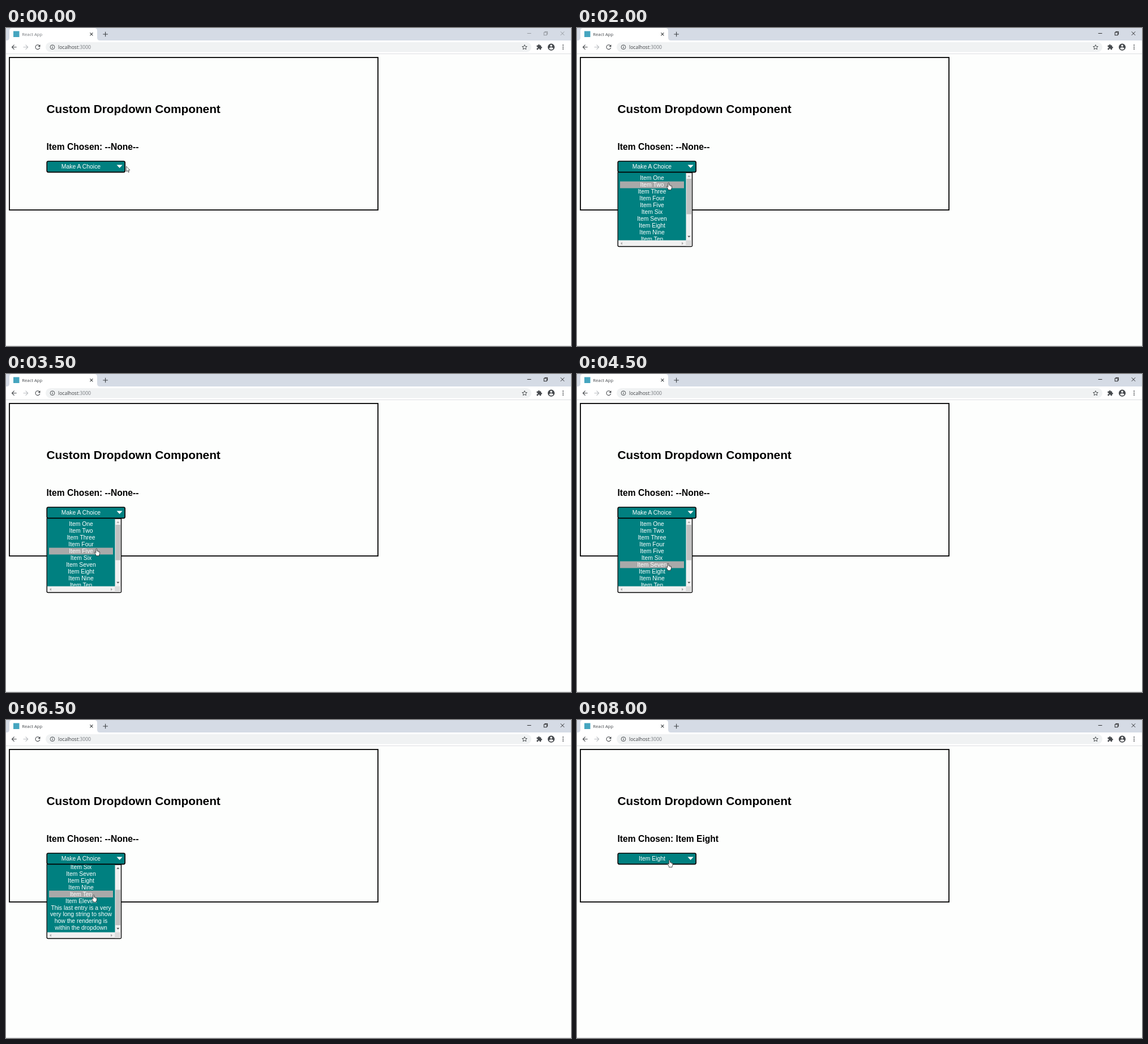
These frames come from a looping animation (998 by 561 pixels, 8500 ms). An HTML page:

```html
<!DOCTYPE html>
<html lang="en">
<head>
<meta charset="utf-8">
<title>Custom Dropdown Component</title>
<style>
  html, body { margin: 0; width: 100%; height: 100%; overflow: hidden; background: #fdfefd; }
  svg { display: block; width: 100vw; height: 100vh; font: 10.4px "Liberation Sans", Arial, sans-serif; }
  .ui { font-family: "Open Sans", "Noto Sans", sans-serif; }
  .heading { font-weight: bold; }
  .item { fill: #fff; text-anchor: middle; }
  .line { fill: none; stroke: #3c4043; }
  .icon { fill: #46494d; }
  #controls { fill: none; stroke: #1c1c1c; stroke-width: .9; }
  #tabTitle { fill: #45494d; }
  .inactive #controls { stroke: #8f9399; }
  .inactive #tabTitle { fill: #74787d; }
</style>
</head>
<body>
<svg id="stage" viewBox="0 0 998 561">
  <defs>
    <clipPath id="view"><rect x="72.5" y="255.5" width="120" height="119"/></clipPath>
  </defs>
  <rect width="998" height="561" fill="#fdfefd"/>

  <!-- browser window -->
  <rect width="998" height="22" fill="#d5dbe5"/>
  <path d="M1 22q5 0 5-5V5q0-5 5-5h145q5 0 5 5v12q0 5 5 5z" fill="#fff"/>
  <rect y="22" width="998" height="23" fill="#fff"/>
  <rect y="45" width="998" height="1" fill="#dcdee1"/>
  <rect x="13" y="5.5" width="10.5" height="10.5" fill="#45a5bf"/>
  <text id="tabTitle" class="ui" x="28.3" y="13.7" font-size="7.7">React App</text>
  <path class="line" d="M148.4 8.4l5 5m0-5l-5 5M171.3 11h8.6m-4.3-4.3v8.6" stroke-width="1.1"/>
  <g id="controls">
    <path d="M920.7 9.5h6.8M979.7 6.4l6.4 6.4m0-6.4l-6.4 6.4M951.7 7.6V6.4h4.8v4.8h-1.2"/>
    <rect x="950.2" y="7.8" width="4.9" height="4.9"/>
  </g>
  <rect x="70" y="25" width="858" height="17.4" rx="8.7" fill="#f0f2f3"/>
  <g id="icons" class="icon"></g>
  <circle class="line" cx="82" cy="33.7" r="3.9" stroke-width=".9"/>
  <path class="line" d="M82 33v2.8M82 31.3v1" stroke-width="1"/>
  <text class="ui" x="92" y="36.8" font-size="8.6" fill="#3b3e42">localhost<tspan fill="#75797e">:3000</tspan></text>
  <path class="line" d="M916 29.6l1.25 2.8 3.05.3-2.3 2 .7 3-2.7-1.6-2.7 1.6.7-3-2.3-2 3.05-.3z" stroke-width=".9"/>
  <g class="icon">
    <circle cx="984" cy="30.3" r="1"/><circle cx="984" cy="33.7" r="1"/><circle cx="984" cy="37.1" r="1"/>
  </g>
  <rect y="560" width="998" height="1" fill="#dfe2e3"/>

  <!-- page -->
  <rect x="6" y="52" width="651" height="269" fill="none" stroke="#000" stroke-width="1.8"/>
  <text class="heading" x="71.5" y="150.2" font-size="20.8">Custom Dropdown Component</text>
  <text class="heading" x="71.5" y="214.6" font-size="15.6">Item Chosen: <tspan id="chosen"></tspan></text>

  <g id="list">
    <path d="M72.2 255V383.5q0 2 2 2H201.500q2 0 2-2V255z" fill="#f1f1f1" stroke="#000" stroke-width="1.4"/>
    <rect x="72.8" y="255" width="119.700" height="119.500" fill="#008080"/>
    <rect x="192.300" y="374.500" width="10.500" height="10.300" fill="#dcdcdc"/>
    <g clip-path="url(#view)"><g id="items">
      <rect id="hover" x="76" width="113" fill="#a9a9a9"/>
    </g></g>
    <rect id="thumb" x="193.500" width="8.700" height="62.500" fill="#c1c1c1"/>
    <path id="up" d="M195.300 262.800l2.500-2.800 2.500 2.800z"/>
    <path d="M195.300 366.700l2.500 2.800 2.500-2.800z" fill="#505050"/>
    <path d="M79.800 377.500l-2.700 2.500 2.700 2.500zM185.200 377.500l2.700 2.500-2.700 2.500z" fill="#a3a3a3"/>
  </g>

  <rect x="72.200" y="235" width="138" height="19.400" rx="2.600" fill="#008080" stroke="#000" stroke-width="1.600"/>
  <text id="label" class="item" x="132.500" y="248.300"></text>
  <path d="M195.500 241.600h10.200l-5.100 5.300z" fill="#fff"/>

  <path id="arrow" transform="translate(212.500 244)" d="M0 0V9.200L2.100 7.300 3.500 10.600 5 10 3.600 6.800H6.400z" fill="#fff" stroke="#333" stroke-width=".8"/>
  <g id="hand" stroke="#222" stroke-width=".8">
    <path d="M-2.200-5.400a1 1 0 0 1 2 0v3.200q1.300-.6 1.800.4 1.300-.4 1.600.6 1.200-.2 1.300 1V2q0 1.600-1 2.600V6.200H-2V5L-4.300.9q-.6-1.500.7-1.400l1.400 1.500z" fill="#fff"/>
    <path d="M1.600-1.800v1.900M3.200-1.200V.4" stroke-width=".5"/>
  </g>
</svg>
<script>
const LOOP = 8500, STEP = 500;
const FIRST = 258.700, ROW = 11.950, SCROLL = 65.200;
const $ = id => document.getElementById(id);

function add(parent, tag, attrs, text = '') {
  const el = document.createElementNS('http://www.w3.org/2000/svg', tag);
  for (const key in attrs) el.setAttribute(key, attrs[key]);
  el.textContent = text;
  return parent.appendChild(el);
}

function icon(x, y, scale, d, attrs = {}) {
  const transform = `translate(${x} ${y}) scale(${scale}) translate(-12 -12)`;
  add($('icons'), 'path', { d, transform, 'fill-rule': 'evenodd', ...attrs });
}

const back = 'M20 11H7.8l5.600-5.600L12 4l-8 8 8 8 1.400-1.400L7.800 13H20z';
icon(14.200, 33.700, .56, back);
icon(35, 33.700, -.56, back, { fill: '#b9bcc0' });
icon(56, 33.700, .56, 'M17.650 6.350A8 8 0 1 0 19.730 14h-2.080A6 6 0 1 1 12 6c1.660 0 3.140.69 4.220 1.780L13 11h7V4z');
icon(942, 33.700, .46, 'M20.500 11H19V7q0-2-2-2h-4V3.500a2.500 2.500 0 0 0-5 0V5H4Q2 5 2 7v3.800h1.500a2.700 2.700 0 0 1 0 5.400H2V20q0 2 2 2h3.800v-1.500a2.700 2.700 0 0 1 5.400 0V22H17q2 0 2-2v-4h1.500a2.500 2.500 0 0 0 0-5z');
icon(963, 33.700, .61, 'M12 2a10 10 0 1 0 0 20 10 10 0 0 0 0-20zm0 3a3 3 0 1 1 0 6 3 3 0 0 1 0-6zm0 14.200a7.200 7.200 0 0 1-6-3.200c0-2 4-3.100 6-3.100s6 1.100 6 3.100a7.200 7.200 0 0 1-6 3.200z');

const numbers = 'One Two Three Four Five Six Seven Eight Nine Ten Eleven'.split(' ');
const rows = [
  ...numbers.map(n => 'Item ' + n),
  'This last entry is a very', 'very long string to show', 'how the rendering is', 'within the dropdown'
];
const LAST = numbers.length;
rows.forEach((text, i) => add($('items'), 'text', { class: 'item', x: 132.500, y: FIRST + i * ROW + 9.600 }, text));

// pointer x, pointer y, hovered item (-1 for none)
const steps = [
  [212, 244, -1], [201, 247, -1], [188, 250, -1], [174, 267.500, 0], [163, 279.500, 1],
  [158.500, 292, 2], [160, 303.500, 3], [161, 314.500, 4], [162, 328.500, 5], [162, 340.500, 6],
  [160, 350.500, 7], [159.500, 355, 7], [158, 338, LAST], [156, 315, 9], [156, 302.500, 8],
  [157, 290, 7], [164.500, 253.500, -1]
];

const show = (id, on) => $(id).setAttribute('visibility', on ? 'visible' : 'hidden');
let shown = -1;

function draw(n) {
  const [x, y, item] = steps[n];
  const done = n === 16, open = n > 1 && !done, scrolled = n > 10;
  $('stage').classList.toggle('inactive', n < 2);
  $('chosen').textContent = done ? rows[7] : '--None--';
  $('label').textContent = done ? rows[7] : 'Make A Choice';

  $('list').style.display = open ? '' : 'none';
  $('items').setAttribute('transform', `translate(0 ${scrolled ? -SCROLL : 0})`);
  $('thumb').setAttribute('y', scrolled ? 299.500 : 266);
  $('up').setAttribute('fill', scrolled ? '#505050' : '#a3a3a3');
  $('hover').style.display = item < 0 ? 'none' : '';
  $('hover').setAttribute('y', FIRST + item * ROW);
  $('hover').setAttribute('height', item === LAST ? ROW * 4 : ROW);

  show('arrow', n === 0);
  show('hand', n > 0);
  $('hand').setAttribute('transform', `translate(${x} ${y})`);
}

function tick() {
  const n = Math.floor(performance.now() % LOOP / STEP);
  if (n !== shown) draw(shown = n);
  requestAnimationFrame(tick);
}
tick();
</script>
</body>
</html>
```
